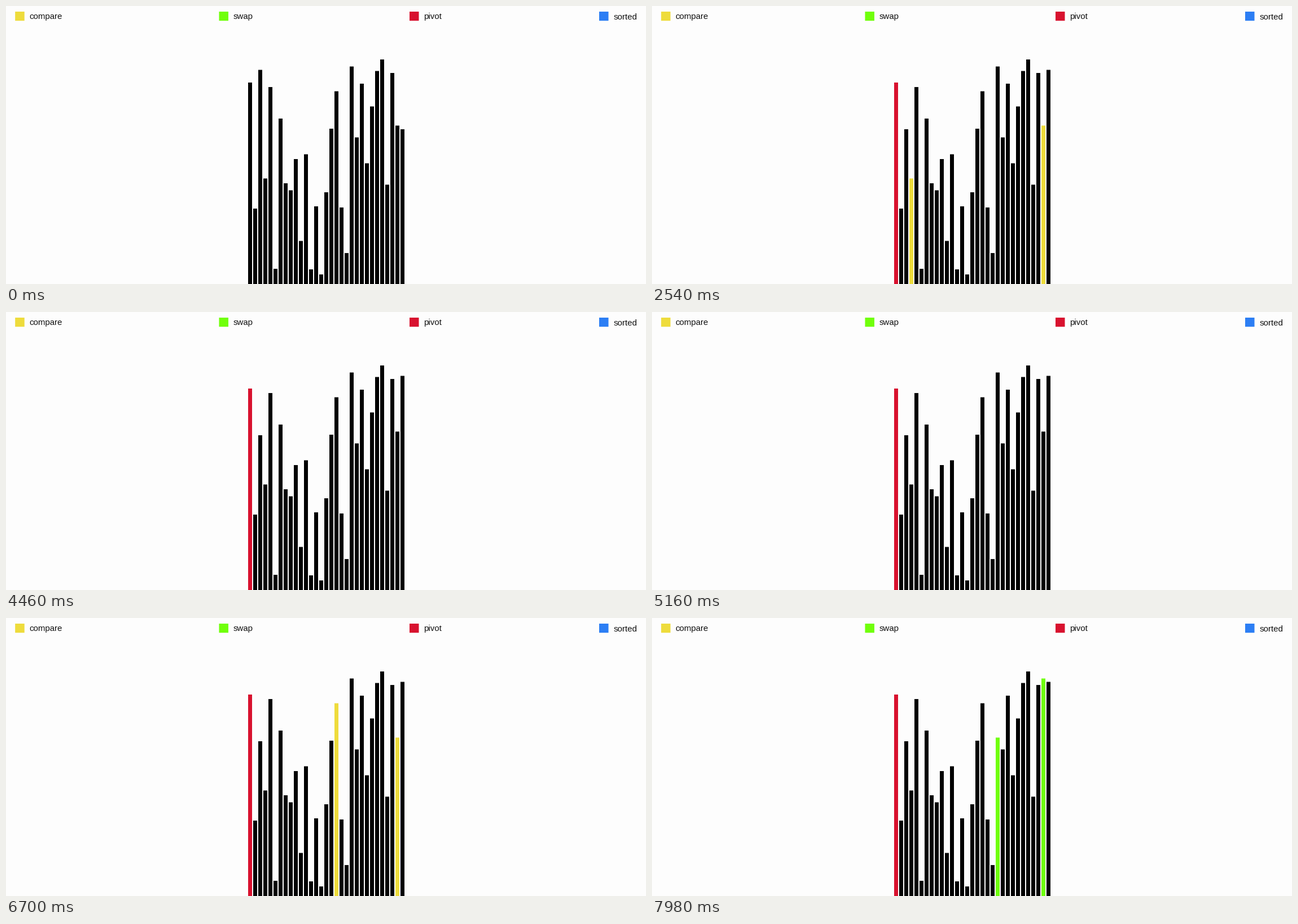
A matplotlib script for the animation above (8000 ms loop, 1134 by 494 pixels).

```python
import matplotlib.pyplot as plt
from matplotlib.animation import FuncAnimation
from matplotlib.patches import Rectangle

W, H, DPI = 1134, 494, 64
FRAMES, INTERVAL = 400, 20

YELLOW, GREEN, RED, BLUE = "#eedc3c", "#70ff0a", "#d8122f", "#2c7ef4"
BLACK = "#000000"

TOPS = [136, 360, 113.5, 306.5, 144, 467, 200, 315, 327.5, 272, 417.5,
        263.5, 468, 356, 477, 331, 218, 151.5, 358, 439, 107.5, 233.5,
        138, 279.5, 178.5, 115.5, 95, 317.5, 119, 212.5, 219]

# The sort advances one step every STEP ticks; highlights last half a step.
STEP, START = 6.4, 27.3

fig = plt.figure(figsize=(W / DPI, H / DPI), dpi=DPI, facecolor="#fdfdfd")
ax = fig.add_axes([0, 0, 1, 1])
ax.set_xlim(0, W)
ax.set_ylim(H, 0)
ax.axis("off")


def box(x, y, w, h, color):
    return ax.add_patch(Rectangle((x, y), w, h, fc=color, lw=0, snap=False))


def legend(x, label, color):
    box(x, 10, 16.5, 16.2, color)
    ax.text(x + 25.2, 23.5, label, family="Liberation Sans",
            size=15 * 72 / DPI, color="#111111", va="baseline")


for item in [(16.2, "compare", YELLOW), (377.5, "swap", GREEN),
             (715, "pivot", RED), (1051, "sorted", BLUE)]:
    legend(*item)

bars = [box(429 + 9 * i, top, 7, H - top, BLACK)
        for i, top in enumerate(TOPS)]


def partition_steps():
    """List (step kind, left, right) for the pass around the first bar."""
    tops, steps = TOPS[:], []
    i, j = 1, len(tops) - 1
    while i <= j:
        steps.append(("compare", i, j))
        if tops[i] >= tops[0]:
            i += 1
        elif tops[j] < tops[0]:
            j -= 1
        else:
            steps.append(("swap", i, j))
            tops[i], tops[j] = tops[j], tops[i]
            i, j = i + 1, j - 1
    return steps


STEPS = [("pivot", 0, 0)] + partition_steps()


def tick(n):
    """Uneven cadence: two short ticks, then a long one, every 140 ms."""
    block, pos = divmod(n + 1, 7)
    return 3 * block + min(pos, 2) - 1


def draw(n):
    progress = (tick(n) - START) / STEP
    tops = TOPS[:]
    colors = [BLACK] * len(tops)
    if progress >= 0:
        now = int(progress)
        for kind, i, j in STEPS[:now + 1]:
            if kind == "swap":
                tops[i], tops[j] = tops[j], tops[i]
        kind, i, j = STEPS[now]
        if progress - now < 0.5:
            colors[i] = colors[j] = GREEN if kind == "swap" else YELLOW
        colors[0] = RED
    for bar, top, color in zip(bars, tops, colors):
        bar.set_y(top)
        bar.set_height(H - top)
        bar.set_facecolor(color)
    return bars


anim = FuncAnimation(fig, draw, frames=FRAMES, interval=INTERVAL,
                     init_func=lambda: draw(0), repeat=True, repeat_delay=0)
plt.show()
```
